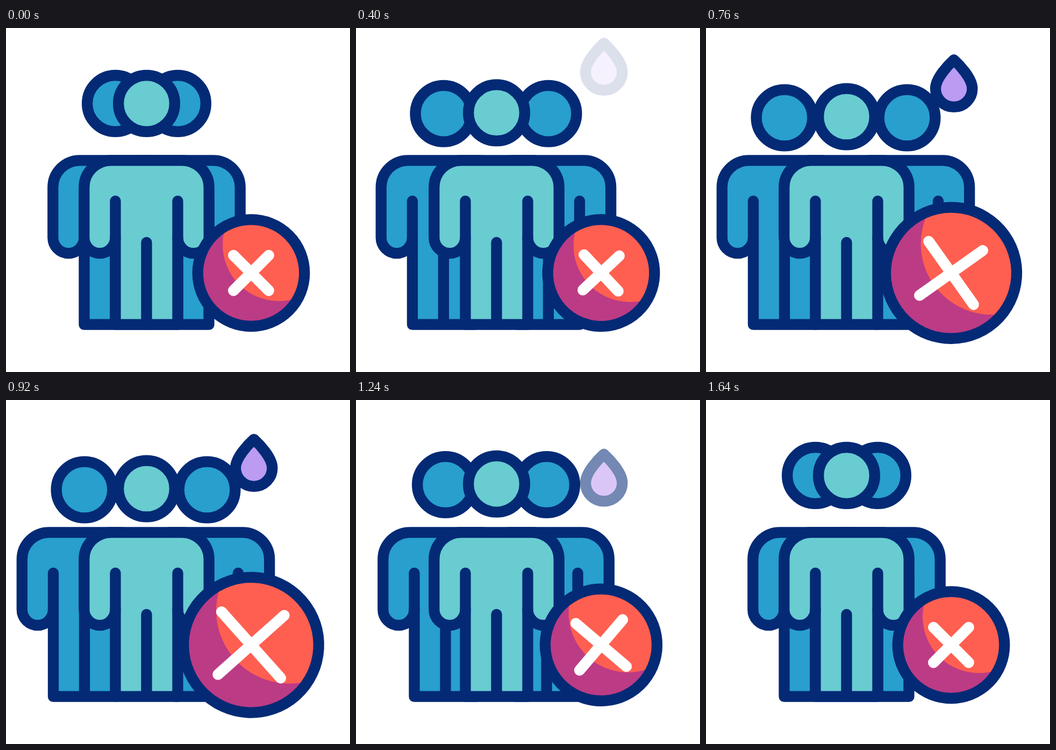
An HTML page with a canvas that plays this animation: 640 by 640 pixels, repeating every 1.68 s.

```html
<!DOCTYPE html>
<html lang="en">
<head>
<meta charset="utf-8">
<title>Group distance</title>
<style>
  html, body { margin: 0; width: 100%; height: 100%; overflow: hidden; background: #fff; }
  canvas { display: block; width: 640px; height: 640px; }
</style>
</head>
<body>
<canvas id="stage" width="640" height="640"></canvas>
<script>
const ctx = document.getElementById('stage').getContext('2d');
const LOOP = 1680, STEP = 40, LINE = 20.3;
const NAVY = [4, 42, 117], LILAC = [188, 155, 242];
const INK = rgb(NAVY), BLUE = '#289fcd', TEAL = '#68ccd1';
const RED = '#ff5f50', PLUM = '#bc3b85';

function rgb(c) { return `rgb(${c.map(Math.round).join(',')})`; }
const onWhite = (c, alpha) => rgb(c.map(v => 255 + (v - 255) * alpha));
const progress = (t, from, to) => Math.min(1, Math.max(0, (t - from) / (to - from)));
const smooth = s => s * s * (3 - 2 * s);

// Same curve as cubic-bezier(.5, 0, .5, 1)
function strongEase(x) {
  let low = 0, high = 1;
  for (let i = 0; i < 24; i++) {
    const s = (low + high) / 2;
    if (1.5 * s * (1 - s) + s ** 3 < x) low = s; else high = s;
  }
  return smooth(low);
}

const pulse = (t, start, peak, fall, end, ease = smooth) =>
  ease(progress(t, start, peak)) - ease(progress(t, fall, end));

// Eased interpolation through [time, value] keys
function keyed(t, keys) {
  let value = keys[0][1];
  for (let i = 1; i < keys.length; i++) {
    const [from, a] = keys[i - 1], [to, b] = keys[i];
    value += (b - a) * smooth(progress(t, from, to));
  }
  return value;
}

function circle(x, y, r) {
  ctx.beginPath();
  ctx.arc(x, y, r, 0, Math.PI * 2);
}

function paint(fill, ink = INK) {
  ctx.fillStyle = fill;
  ctx.strokeStyle = ink;
  ctx.fill();
  ctx.stroke();
}

function head(x, y, fill) {
  circle(x, y, 52.4);
  paint(fill);
}

function body(x, fill) {
  const arm = 116.2, leg = 58, elbow = 390, top = 246.3, foot = 551.7;
  ctx.save();
  ctx.translate(x, 0);
  ctx.beginPath();
  ctx.rect(-leg, 300, 2 * leg, foot - 300);
  ctx.fillStyle = fill;
  ctx.fill();
  ctx.beginPath();
  ctx.moveTo(-leg, 322);
  ctx.lineTo(-leg, elbow);
  ctx.arc(-(arm + leg) / 2, elbow, (arm - leg) / 2, 0, Math.PI);
  ctx.arcTo(-arm, top, 0, top, 50);
  ctx.arcTo(arm, top, arm, elbow, 50);
  ctx.lineTo(arm, elbow);
  ctx.arc((arm + leg) / 2, elbow, (arm - leg) / 2, 0, Math.PI);
  ctx.lineTo(leg, 322);
  paint(fill);
  ctx.beginPath();
  ctx.moveTo(-leg, elbow);
  ctx.lineTo(-leg, foot);
  ctx.lineTo(leg, foot);
  ctx.lineTo(leg, elbow);
  ctx.moveTo(0, 399);
  ctx.lineTo(0, foot);
  ctx.stroke();
  ctx.restore();
}

function drop(t) {
  const alpha = progress(t, 360, 638) - progress(t, 1117, 1395);
  if (alpha <= 0) return;
  ctx.save();
  ctx.translate(461.2, 28.2 + 0.0863 * (t - 400));
  ctx.beginPath();
  ctx.moveTo(0, 0);
  ctx.bezierCurveTo(-10, 9, -34.2, 34, -34.2, 53.5);
  ctx.arc(0, 53.5, 34.2, Math.PI, 0, true);
  ctx.bezierCurveTo(34.2, 34, 10, 9, 0, 0);
  ctx.closePath();
  paint(onWhite(LILAC, alpha), onWhite(NAVY, alpha));
  ctx.restore();
}

function badge(t) {
  const radius = 99.3 + 26.7 * pulse(t, 385, 880, 898, 1366);
  const reach = 32.8 + 26.3 * pulse(t, 388, 978, 978, 1448);
  const turn = keyed(t, [[280, 0], [720, 10], [1150, -5.1], [1610, 0]]);
  const scale = (radius - LINE / 2) / 89.2;
  ctx.save();
  ctx.translate(456, 455.7);
  ctx.rotate(turn * Math.PI / 180);

  ctx.save();
  circle(0, 0, radius);
  ctx.clip();
  ctx.fillStyle = PLUM;
  ctx.fill();
  circle(52 * scale, -52.6 * scale, 105 * scale);
  ctx.fillStyle = RED;
  ctx.fill();
  ctx.restore();

  circle(0, 0, radius);
  ctx.strokeStyle = INK;
  ctx.stroke();

  ctx.beginPath();
  for (const side of [-1, 1]) {
    ctx.moveTo(-reach * side, -reach);
    ctx.lineTo(reach * side, reach);
  }
  ctx.strokeStyle = '#fff';
  ctx.stroke();
  ctx.restore();
}

function draw(t) {
  const spread = pulse(t, 50, 625, 1009, 1551, strongEase);
  const middle = 261.5;
  const left = middle - 58 - 57.5 * spread;
  const right = middle + 58 + 54.5 * spread;
  const sideY = 140.4 + 26.6 * spread;

  ctx.fillStyle = '#fff';
  ctx.fillRect(0, 0, 640, 640);
  ctx.lineWidth = LINE;
  ctx.lineCap = ctx.lineJoin = 'round';

  drop(t);
  for (const x of [left, right]) {
    body(x, BLUE);
    head(x, sideY, BLUE);
  }
  body(middle, TEAL);
  head(middle, 140.4 + 24.6 * spread, TEAL);
  badge(t);
}

const start = performance.now();
function tick() {
  const t = (performance.now() - start) % LOOP;
  draw(Math.floor(t / STEP) * STEP);
  requestAnimationFrame(tick);
}
tick();
</script>
</body>
</html>
```
